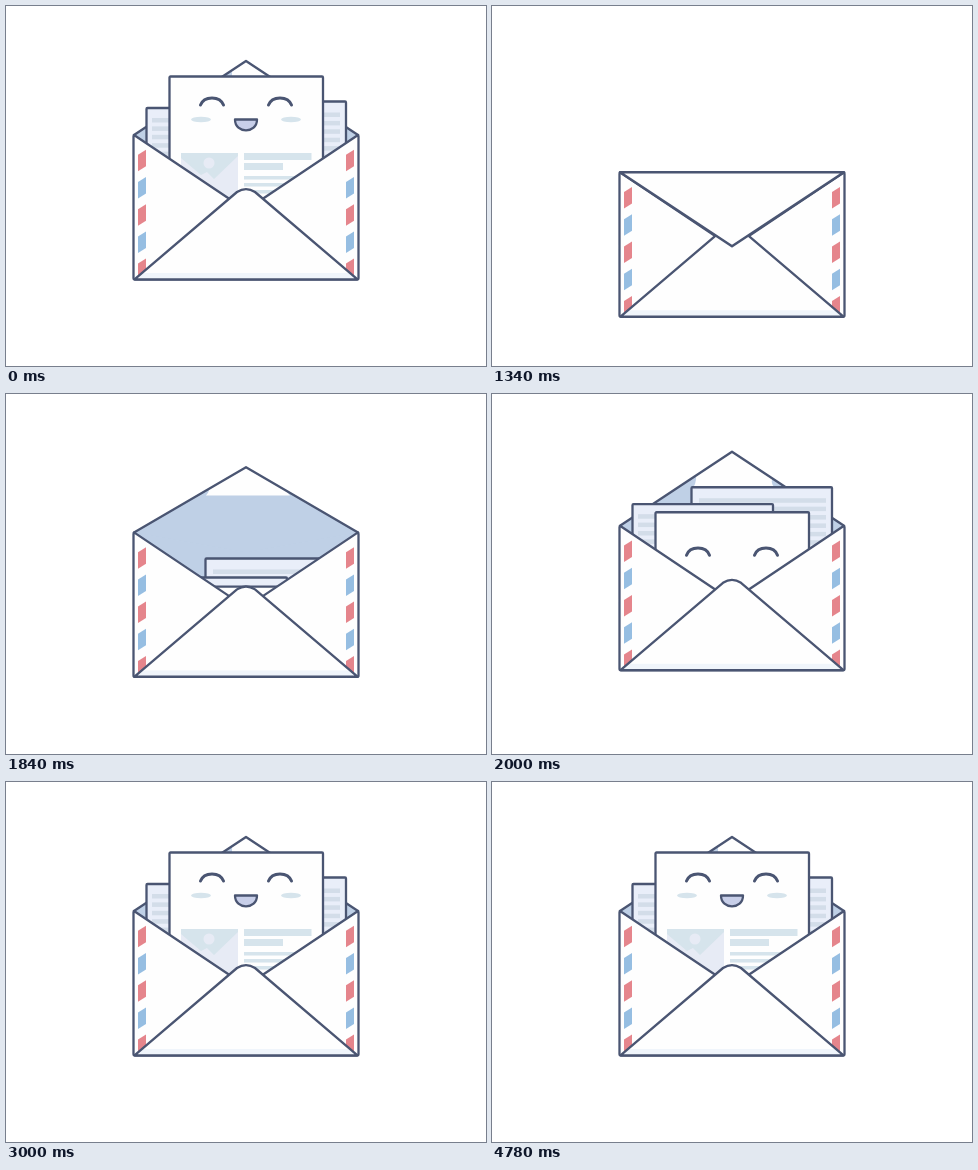
An HTML page for the animation above (4.8 s loop, 480 by 360 pixels).

```html
<!DOCTYPE html>
<html lang="en">
<head>
<meta charset="utf-8">
<title>Happy letter</title>
<style>
  html, body { margin: 0; width: 100%; height: 100%; overflow: hidden; background: #fff; }
  svg { display: block; width: 480px; height: 360px; }
  .ink { stroke: #4a5572; stroke-width: 2.3; stroke-linejoin: round; stroke-linecap: round; }
  .paper { fill: #fefefe; }
  .sheet { fill: #e9eef9; }
  .rule { fill: #d3dde9; }
  .tint { fill: #d6e4ec; }
  .lining { fill: #bfd0e6; }
  #flapFront { stroke-width: 2.6; }
</style>
</head>
<body>
<svg viewBox="0 0 480 360">
  <defs>
    <clipPath id="inside"><path d="M100 0H380V268H100Z"/></clipPath>
    <clipPath id="open"><path id="openShape"/></clipPath>
  </defs>
  <g id="envelope">
    <path class="lining" d="M128 129H352L240 210Z"/>
    <g id="flapBack">
      <path id="openFill" class="lining"/>
      <path id="cap" class="paper" clip-path="url(#open)"/>
      <path id="openLine" class="ink" fill="none"/>
    </g>
    <g clip-path="url(#inside)">
      <g id="right"><rect class="sheet ink" x="199.5" y="1" width="140.5" height="170" rx="1"/></g>
      <g id="left"><rect class="sheet ink" x="140.5" y="1" width="140.5" height="170" rx="1"/></g>
      <g id="main">
        <rect class="paper ink" x="163.5" y=".5" width="153.5" height="190" rx="1"/>
        <path fill="#e7ebf5" d="M175 77H232V125H175Z"/>
        <path class="tint" d="M175 77H232V80L208 103L201 96L195 99L175 82Z"/>
        <circle cx="203" cy="87" r="5.5" fill="#e7ebf5"/>
        <path class="tint" d="M238 77h67.500v7h-67.500zM238 87h39v7h-39zM238 100h67v3.500h-67zM238 107h67v3.500h-67zM238 114h67v3.500h-67z"/>
        <g id="face">
          <path class="ink" style="stroke-width:3" fill="none" d="M194.500 29C198 19.500 214 19.500 217.500 29M262.500 29C266 19.500 282 19.500 285.500 29"/>
          <g id="cheeks" class="tint">
            <ellipse cx="195" cy="43.500" rx="10" ry="2.800"/>
            <ellipse cx="285" cy="43.500" rx="10" ry="2.800"/>
          </g>
          <path id="mouth" class="ink" fill="#c8cfe9" d="M229 43.500H251C251 58 229 58 229 43.500Z"/>
        </g>
      </g>
    </g>
    <path class="paper ink" d="M128 129L240 204L352 129Q352.500 129 352.500 130.500V272Q352.500 273.500 351 273.500H129Q127.500 273.500 127.500 272V130.500Q127.500 129 128 129Z"/>
    <g id="stripes"></g>
    <path class="paper" d="M128.500 273.300L231 186Q240 180.300 249 186L351.500 273.300Z"/>
    <path fill="#f0f5fb" d="M136.500 267H343.500L350 272.500H130Z"/>
    <path class="ink" fill="none" d="M128.500 273.300L231 186Q240 180.300 249 186L351.500 273.300Z"/>
    <path id="flapFront" class="paper ink"/>
  </g>
</svg>
<script>
  const LOOP = 4800, START = 1000, END = 3000;
  const HINGE = 129, FLAP = 74;
  const el = id => document.getElementById(id);
  const set = (id, name, value) => el(id).setAttribute(name, value);
  const shift = (id, y) => set(id, 'transform', `translate(0 ${y.toFixed(2)})`);

  // Smooth curve through [time, value] points that never overshoots them.
  function track(...points) {
    const slope = i => {
      const a = points[i], b = points[i + 1];
      return (b[1] - a[1]) / (b[0] - a[0]);
    };
    const tangents = points.map((_, i) => {
      if (i === 0 || i === points.length - 1) return 0;
      const a = slope(i - 1), b = slope(i);
      return a * b <= 0 ? 0 : 2 * a * b / (a + b);
    });
    return t => {
      if (t <= points[0][0]) return points[0][1];
      const next = points.findIndex(p => p[0] > t);
      if (next < 0) return points[points.length - 1][1];
      const i = next - 1, [t0, v0] = points[i], [t1, v1] = points[next];
      const d = t1 - t0, u = (t - t0) / d, u2 = u * u, u3 = u2 * u;
      return v0 * (2 * u3 - 3 * u2 + 1) + v1 * (3 * u2 - 2 * u3)
        + d * (tangents[i] * (u3 - 2 * u2 + u) + tangents[next] * (u3 - u2));
    };
  }

  const drop = track([1000, 0], [1500, 49], [1660, 23.5], [2000, 2.8], [2300, 0]);
  const fold = track([1530, 1], [1660, .68], [1880, -1]);
  const rightTop = track([1720, 195], [2000, 89.5], [2120, 87], [2440, 94.5]);
  const leftTop = track([1760, 195], [2000, 106.5], [2200, 97], [2460, 101]);
  const mainTop = track([1780, 195], [2000, 115.2], [2300, 64], [2460, 67], [2850, 70]);
  const faceLag = track([1780, 20], [2000, 14.5], [2300, 0]);
  const smile = track([2020, 0], [2280, 1]);
  const capEdge = track([2000, 204], [2460, 226]);

  function addRules(id, x, first) {
    for (let i = 0; i < 7; i++) {
      el(id).insertAdjacentHTML('beforeend',
        `<rect class="rule" x="${x}" y="${first + i * 8.4}" width="127" height="4.5"/>`);
    }
  }
  addRules('left', 146, 11);
  addRules('right', 207, 12);

  for (const x of [132, 340]) {
    for (let i = 0; i < 5; i++) {
      el('stripes').insertAdjacentHTML('beforeend',
        `<path fill="${i % 2 ? '#96bee2' : '#e5858c'}" d="M${x} ${148.8 + i * 27.2}l8 -5v16.500l-8 5z"/>`);
    }
  }

  function draw(time) {
    const t = time < START ? END : Math.min(time, END);
    shift('envelope', drop(t));
    shift('right', rightTop(t));
    shift('left', leftTop(t));
    shift('main', mainTop(t));
    shift('face', faceLag(t));

    const s = smile(t);
    set('mouth', 'transform', `translate(240 43.5) scale(${s}) translate(-240 -43.5)`);
    set('mouth', 'visibility', s > 0 ? 'visible' : 'hidden');
    set('cheeks', 'opacity', s);

    const f = fold(t), tip = HINGE + f * FLAP, closed = f > 0;
    const edge = `M128 ${HINGE}L240 ${tip}L352 ${HINGE}`;
    set('flapFront', 'd', edge + 'Z');
    set('flapFront', 'visibility', closed ? 'visible' : 'hidden');
    set('flapBack', 'visibility', closed ? 'hidden' : 'visible');
    for (const id of ['openShape', 'openFill']) set(id, 'd', `${edge}L240 ${HINGE + 20}Z`);
    set('openLine', 'd', edge);
    const c = capEdge(t);
    set('cap', 'd', `M${c} 40V76Q${c + 1} 87 ${c - 4} 92H284Q276 86 283 76V40Z`);
  }

  function tick(now) {
    draw(now % LOOP);
    requestAnimationFrame(tick);
  }
  draw(0);
  requestAnimationFrame(tick);
</script>
</body>
</html>
```
